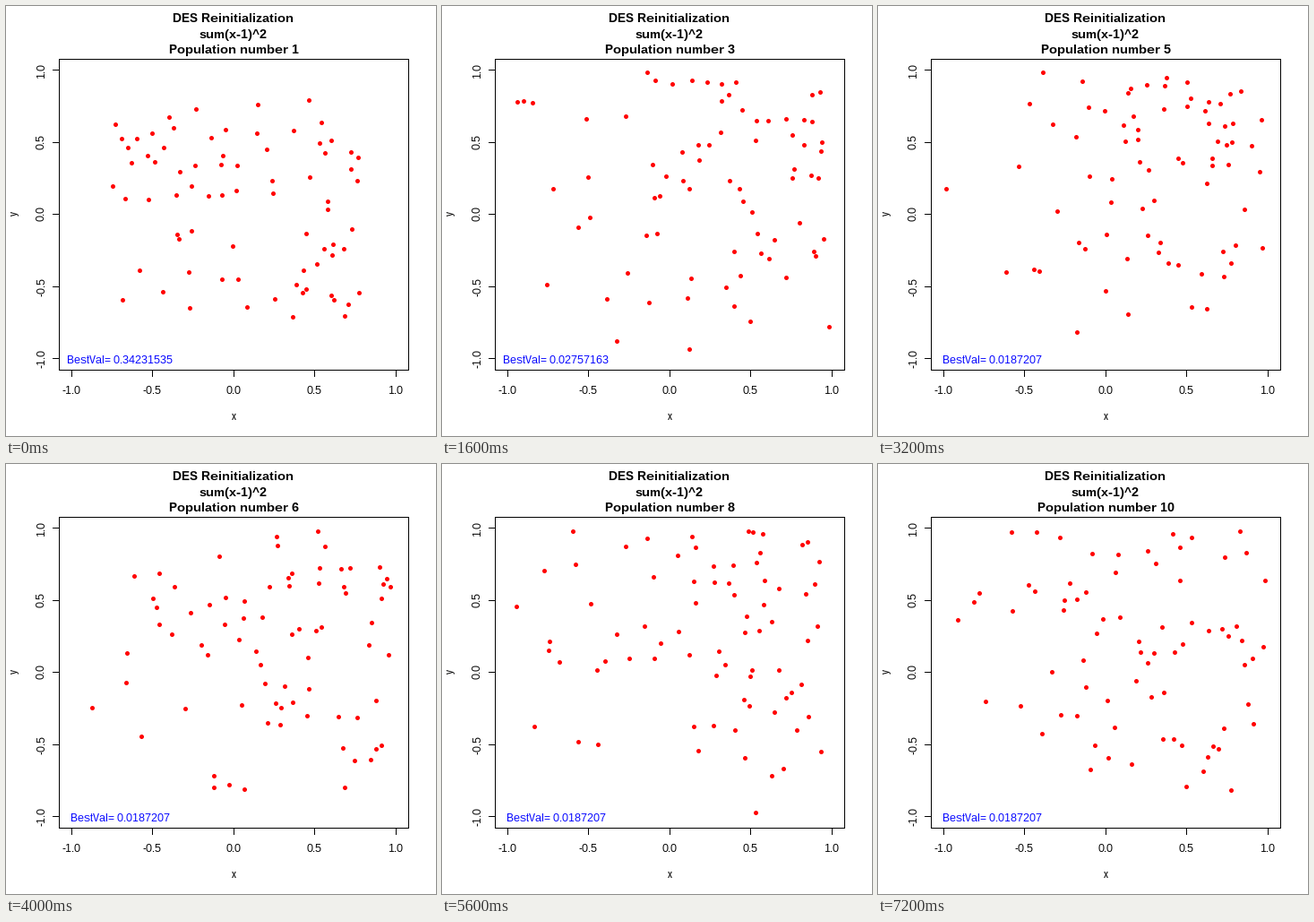
These frames come from a looping animation (480 by 480 pixels, 8 s). A matplotlib script:

```python
import numpy as np
import matplotlib.pyplot as plt
from matplotlib.animation import FuncAnimation
from matplotlib.collections import PatchCollection
from matplotlib.patches import Circle

SIZE, DPI = 480, 80
PX = 72 / DPI  # points per pixel
POPULATIONS, POINTS = 10, 75
LEFT, RIGHT, TOP, BOTTOM = 59, 449, 59, 406
TICK = 7

plt.rcParams.update({
    "font.family": "Liberation Sans",
    "text.hinting": "native",
    "text.hinting_factor": 1,
})


def to_px(x, y):
    return int(254.4 + 180.9 * x), int(232.8 - 160.9 * y)


def population(number):
    """Seeded scatter: even at first, then crowding towards (1, 1)."""
    rng = np.random.default_rng(40 + number)
    reach = 0.8 if number == 1 else 0.99
    crowding = min(1 + 0.25 * (number - 1), 1.75)
    members = []
    while len(members) < POINTS:
        x, y = reach * (2 * rng.random(2) ** (1 / crowding) - 1)
        px, py = to_px(x, y)
        if all(np.hypot(px - a, py - b) > 5 for a, b in members):
            members.append((px, py))
    return members


def best_value(number):
    if number == 1:
        return "0.34231535"
    return "0.02757163" if number < 5 else "0.0187207"


def line(xs, ys):
    ax.plot(xs, ys, color="black", lw=PX, antialiased=False,
            solid_capstyle="butt")


def label(x, y, text, size=12, **style):
    return ax.text(x, y, text, fontsize=size * PX, ha="center",
                   va="baseline", rotation_mode="anchor", **style)


fig = plt.figure(figsize=(SIZE / DPI, SIZE / DPI), dpi=DPI, facecolor="white")
ax = fig.add_axes([0, 0, 1, 1])
ax.set_xlim(0, SIZE)
ax.set_ylim(SIZE, 0)
ax.axis("off")

line([LEFT, RIGHT, RIGHT, LEFT, LEFT], [TOP, TOP, BOTTOM, BOTTOM, TOP])
for value in np.linspace(-1, 1, 5):
    tick_x, tick_y = to_px(value, value)
    line([tick_x, tick_x], [BOTTOM, BOTTOM + TICK])
    line([LEFT, LEFT - TICK], [tick_y, tick_y])
    label(tick_x, 433, f"{value:.1f}")
    label(43, tick_y, f"{value:.1f}", rotation=90)
label(254, 462, "x")
label(13, 232, "y", rotation=90)

label(254, 18, "DES Reinitialization", 14, weight="bold")
label(254, 36, "sum(x-1)^2", 14, weight="bold")
title = label(254, 53, "", 14, weight="bold")
best = label(127, 399, "", color="blue", zorder=5)
dots = PatchCollection([], facecolor="red", linewidth=0, zorder=3)
ax.add_collection(dots, autolim=False)

scatters = [population(n + 1) for n in range(POPULATIONS)]


def update(i):
    number = i + 1
    title.set_text(f"Population number {number}")
    best.set_text(f"BestVal= {best_value(number)}")
    dots.set_paths([Circle((x + 0.5, y + 0.5), 2.5) for x, y in scatters[i]])
    return title, best, dots


anim = FuncAnimation(fig, update, frames=POPULATIONS, interval=800,
                     repeat=True, repeat_delay=0)
plt.show()
```
